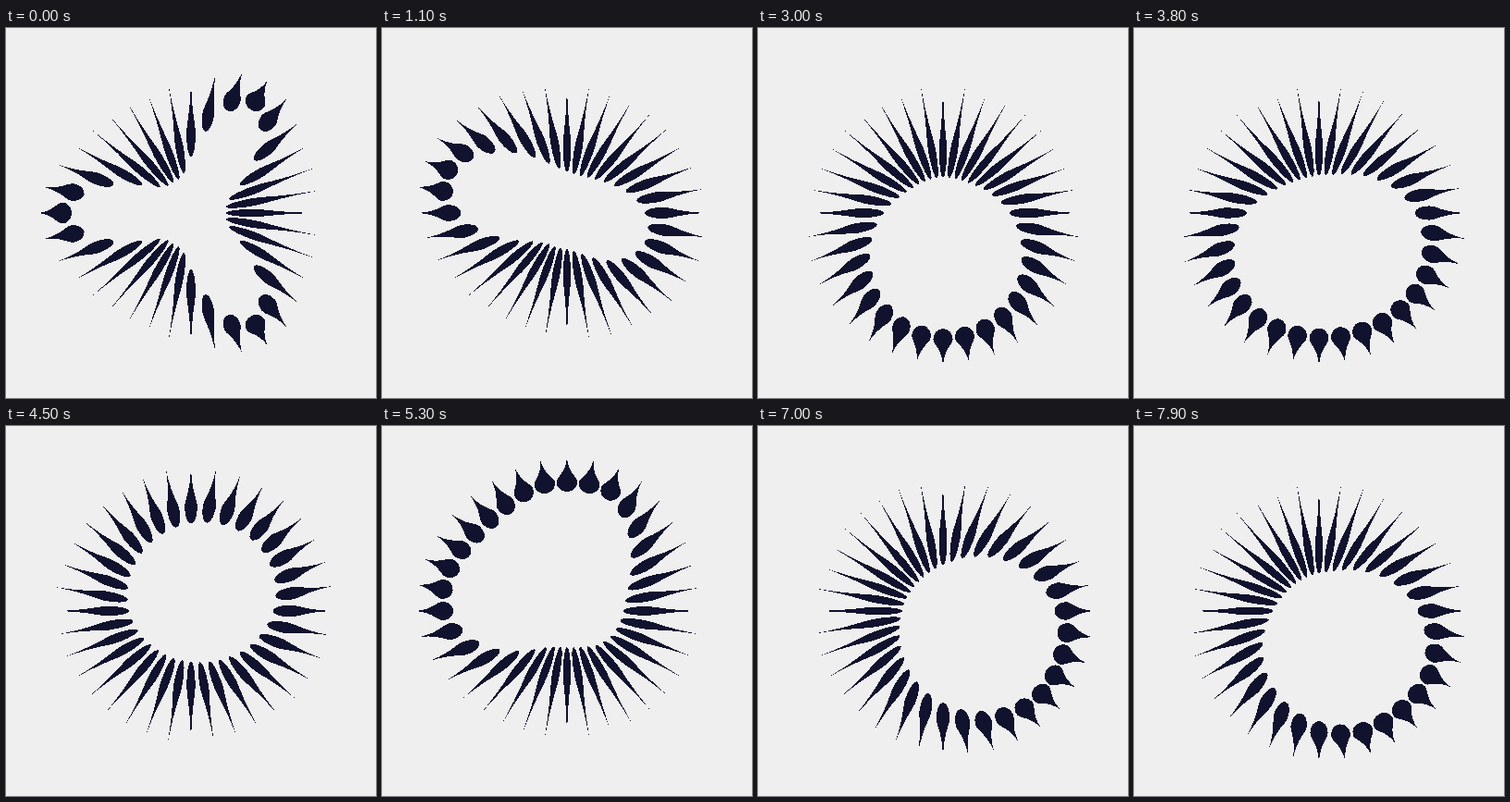
An HTML page that plays this animation: 400x400 px, repeating every 8 s.

```html
<!DOCTYPE html>
<html lang="en">
<head>
<meta charset="utf-8">
<title>Petal ring</title>
<style>
  html, body { margin: 0; width: 100%; height: 100%; overflow: hidden; background: #efefef; }
  svg { display: block; width: 100%; height: 100%; }
</style>
</head>
<body>
<svg viewBox="0 0 400 400"><path id="ring" fill="#10122e" shape-rendering="crispEdges"/></svg>
<script>
const COUNT = 36, LOOP = 8000, STEP = 100, AREA = 820, RAD = Math.PI / 180;
const ring = document.getElementById('ring');
const clamp = v => Math.min(1, Math.max(0, v));
const mix = (a, b, k) => a + (b - a) * k;

// A pose is a mean level plus waves with 1, 2 and 3 lobes, each [amplitude, peak angle]
const pose = (time, mean, ...waves) => ({
  time,
  level: a => waves.reduce((sum, [amp, peak], i) => sum + amp * Math.cos((i + 1) * (a - peak) * RAD), mean)
});

const poses = [
  pose(400, 0.5, [0, 0], [0, 0], [0.5, 60]),
  pose(1100, 0.5, [0.11, 126], [0.37, 164], [0.04, 57]),
  pose(1500, 0.58, [0.3, 300], [0.2, 165]),
  pose(2000, 0.5, [0.43, 272], [0.11, 303]),
  pose(2700, 0.5, [0.48, 272]),
  pose(3800, 0.66, [0.42, 283], [0.1, 10]),
  pose(4700, 0.62, [0.36, 75]),
  pose(5300, 0.65, [0.42, 113], [0.08, 0], [0.1, 75]),
  pose(5800, 0.6, [0.42, 208]),
  pose(6100, 0.56, [0.48, 273]),
  pose(6700, 0.6, [0.42, 335]),
  pose(7900, 0.58, [0.47, 303], [0.04, 20])
];

// One petal of constant area: s = 0 is a long spike, s = 1 a round drop
function petal(angle, s) {
  const inner = mix(38, 129, s), length = mix(138, 165, s) - inner, width = AREA / length;
  const c = Math.cos(angle), n = Math.sin(angle);
  const p = (x, y) => {
    const r = inner + x * length, h = y * width;
    return (200 + r * c + h * n).toFixed(2) + ' ' + (200 - r * n + h * c).toFixed(2) + ' ';
  };
  return 'M' + p(0, 0) +
    'C' + p(0, 0.28) + p(0.13, 0.5) + p(0.29, 0.5) +
    'C' + p(0.45, 0.5) + p(0.52, 0.1) + p(1, 0) +
    'C' + p(0.52, -0.1) + p(0.45, -0.5) + p(0.29, -0.5) +
    'C' + p(0.13, -0.5) + p(0, -0.28) + p(0, 0) + 'Z';
}

function draw(ms) {
  const t = Math.floor(ms % LOOP / STEP) * STEP;
  const i = Math.max(1, poses.findIndex(p => p.time >= t));
  const a = poses[i - 1], b = poses[i];
  const k = clamp((t - a.time) / (b.time - a.time));
  let d = '';
  for (let deg = 0; deg < 360; deg += 360 / COUNT) {
    const u = mix(clamp(a.level(deg)), clamp(b.level(deg)), k);
    d += petal(deg * RAD, u * u);
  }
  ring.setAttribute('d', d);
}

const start = performance.now();
function tick() {
  draw(performance.now() - start);
  requestAnimationFrame(tick);
}
tick();
</script>
</body>
</html>
```
